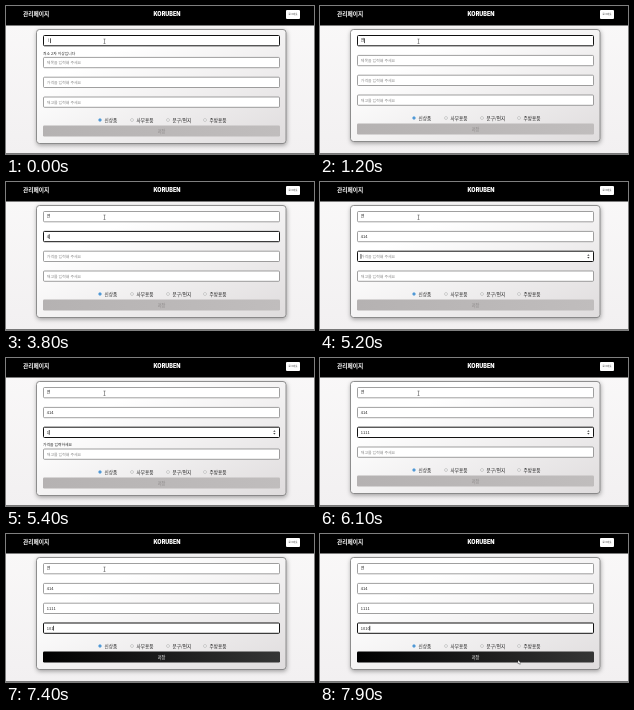
Animation of 308 by 148 pixels, one loop 8 s. Source, as an HTML page:

```html
<!DOCTYPE html>
<html lang="ko">
<head>
<meta charset="utf-8">
<title>관리페이지</title>
<style>
  html, body { margin: 0; width: 100%; height: 100%; overflow: hidden; background: #f5f3f4; }
  svg { display: block; width: 308px; height: 148px; }
  text { font: 4px "Noto Sans CJK KR", "Noto Sans CJK", "Noto Sans CJK JP", sans-serif; fill: #222; }
  .title { font-size: 5.7px; font-weight: 900; fill: #fff; }
  .brand { font: 900 5.5px Inter, sans-serif; fill: #fff; text-anchor: middle; }
  .logout { font-size: 2.4px; text-anchor: middle; }
  .box { fill: #fff; stroke: #777; stroke-width: .7; }
  .focus .box { stroke: #111; stroke-width: 1; }
  .hint { font-size: 3.9px; fill: #8b8b8b; }
  .help { font-size: 3.8px; font-weight: 500; }
  .label { font-size: 4.6px; }
  .save { font-size: 4.2px; text-anchor: middle; fill: #8c8989; }
  .ready .save { fill: #fff; }
  .button { fill: url(#off); }
  .ready .button { fill: url(#on); }
  .caret { fill: #111; }
</style>
</head>
<body>
<svg viewBox="0 0 308 148">
  <defs>
    <linearGradient id="page" x2="0" y2="1">
      <stop stop-color="#faf9f9"/><stop offset="1" stop-color="#f2f0f1"/>
    </linearGradient>
    <linearGradient id="paper" x2="1" y2="1">
      <stop offset=".25" stop-color="#fff"/><stop offset="1" stop-color="#dfdcdd"/>
    </linearGradient>
    <linearGradient id="off"><stop stop-color="#b5b2b2"/><stop offset="1" stop-color="#c0bdbd"/></linearGradient>
    <linearGradient id="on"><stop stop-color="#000"/><stop offset="1" stop-color="#353535"/></linearGradient>
    <filter id="shade" x="-5%" y="-5%" width="110%" height="115%">
      <feDropShadow dx=".5" dy="1.5" stdDeviation="2" flood-opacity=".35"/>
    </filter>
  </defs>

  <rect width="308" height="148" fill="url(#page)"/>
  <rect y="147" width="308" height="1" fill="#777"/>
  <rect width="308" height="19.5"/>
  <text class="title" x="17" y="10.2">관리페이지</text>
  <text class="brand" x="161" y="10.2">KORUBEN</text>
  <rect x="280" y="4" width="14" height="9" rx="1" fill="#fff"/>
  <text class="logout" x="287" y="9.4">로그아웃</text>

  <rect id="card" x="30.5" y="23.5" width="249.5" height="112" rx="3"
        fill="url(#paper)" stroke="#777" stroke-width=".8" filter="url(#shade)"/>
  <g id="fields"></g>
  <g id="foot">
    <g id="radios"></g>
    <rect class="button" x="37" y="117.5" width="237" height="11" rx="1.2"/>
    <text class="save" x="155.5" y="124.6">저장</text>
  </g>
  <path id="beam" d="M97.5 33h2M98.5 33v4.5M97.5 37.5h2" fill="none" stroke="#444" stroke-width=".5"/>
  <path id="arrow" d="M0 0v4l1-.9.7 1.5.6-.3-.7-1.4h1.3z" fill="#fff" stroke="#222" stroke-width=".3"/>
</svg>
<script>
const LOOP = 8000, SHIFT = 2;
const $ = id => document.getElementById(id);

// focus: [from, to]; typed: [time, value]; error: helper line shown; off: caret hidden
const fields = [
  { y: 29.5, focus: [0, 2100], error: [0, 1100], help: '최소 2자 이상입니다', hint: '',
    typed: [[0, 'ㅣ'], [400, '여'], [900, '연']], off: [[200, 400], [1500, 1900]] },
  { y: 49.4, focus: [2100, 5200], error: [0, 0], help: '', hint: '제목을 입력해 주세요',
    typed: [[3800, '4'], [3900, '41'], [4000, '414']], off: [[2500, 3100], [4300, 5200]] },
  { y: 69.2, focus: [5200, 6900], error: [5400, 5600], help: '가격을 입력하세요', hint: '가격을 입력해 주세요',
    typed: [[5400, '1'], [5600, '11'], [5700, '111'], [5800, '1111']], off: [[6100, 6900]] },
  { y: 89, focus: [6900, LOOP], error: [7100, 7400], help: '재고를 입력하세요', hint: '재고를 입력해 주세요',
    typed: [[7100, '1'], [7300, '10'], [7400, '101'], [7500, '1010']], off: [] }
];

const within = (t, [from, to]) => t >= from && t < to;
const show = (el, on) => el.setAttribute('visibility', on ? 'visible' : 'hidden');
const move = (el, x, y) => el.setAttribute('transform', `translate(${x} ${y})`);

function add(parent, markup) {
  parent.insertAdjacentHTML('beforeend', markup);
  return parent.lastElementChild;
}

for (const f of fields) {
  f.el = add($('fields'), `<g>
    <rect class="box" x="37.5" y="0" width="236" height="10.3" rx="1"/>
    <text class="hint" x="40.8" y="6.6">${f.hint}</text>
    <text class="value" x="40.8" y="6.6"></text>
    <rect class="caret" x="0" y="2.8" width=".7" height="4.8"/>
    <text class="help" x="37" y="19">${f.help}</text>
    <path class="spin" d="M267.2 4.6l1.2-1.5 1.2 1.5zM267.2 5.8l1.2 1.5 1.2-1.5z" fill="#444"/>
  </g>`);
  for (const name of ['hint', 'value', 'caret', 'help', 'spin']) f[name] = f.el.querySelector('.' + name);
}

[[94, '신상품'], [126, '사무용품'], [162, '문구/편지'], [199, '주방용품']].forEach(([x, label], i) => {
  add($('radios'), `<g>
    <circle cx="${x}" cy="112" r="1.4" fill="#fff" stroke="${i ? '#999' : '#1878c8'}" stroke-width=".5"/>
    ${i ? '' : `<circle cx="${x}" cy="112" r=".9" fill="#1878c8"/>`}
    <text class="label" x="${x + 4.5}" y="114">${label}</text>
  </g>`);
});

function draw(t) {
  let drop = 0;
  fields.forEach((f, i) => {
    const active = within(t, f.focus);
    const error = within(t, f.error);
    const value = f.typed.reduce((last, [at, s]) => t >= at ? s : last, '');
    move(f.el, 0, f.y + drop);
    f.el.classList.toggle('focus', active);
    if (f.value.textContent !== value) f.value.textContent = value;
    show(f.hint, !value);
    show(f.help, error);
    show(f.spin, active && i === 2);
    show(f.caret, active && !f.off.some(span => within(t, span)));
    f.caret.setAttribute('x', 40.6 + (value ? f.value.getComputedTextLength() : 0));
    if (error) drop += SHIFT;
  });
  move($('foot'), 0, drop);
  $('card').setAttribute('height', 112 + drop);
  $('foot').classList.toggle('ready', t >= 7400);

  const p = Math.min(1, Math.max(0, (t - 7500) / 400));
  const ease = p * p * (3 - 2 * p);
  show($('beam'), t < 7500);
  show($('arrow'), t >= 7500);
  move($('arrow'), 98 + 100 * ease, 35 + 91 * ease);
}

const start = performance.now();
function tick() {
  draw((performance.now() - start) % LOOP);
  requestAnimationFrame(tick);
}
tick();
</script>
</body>
</html>
```
